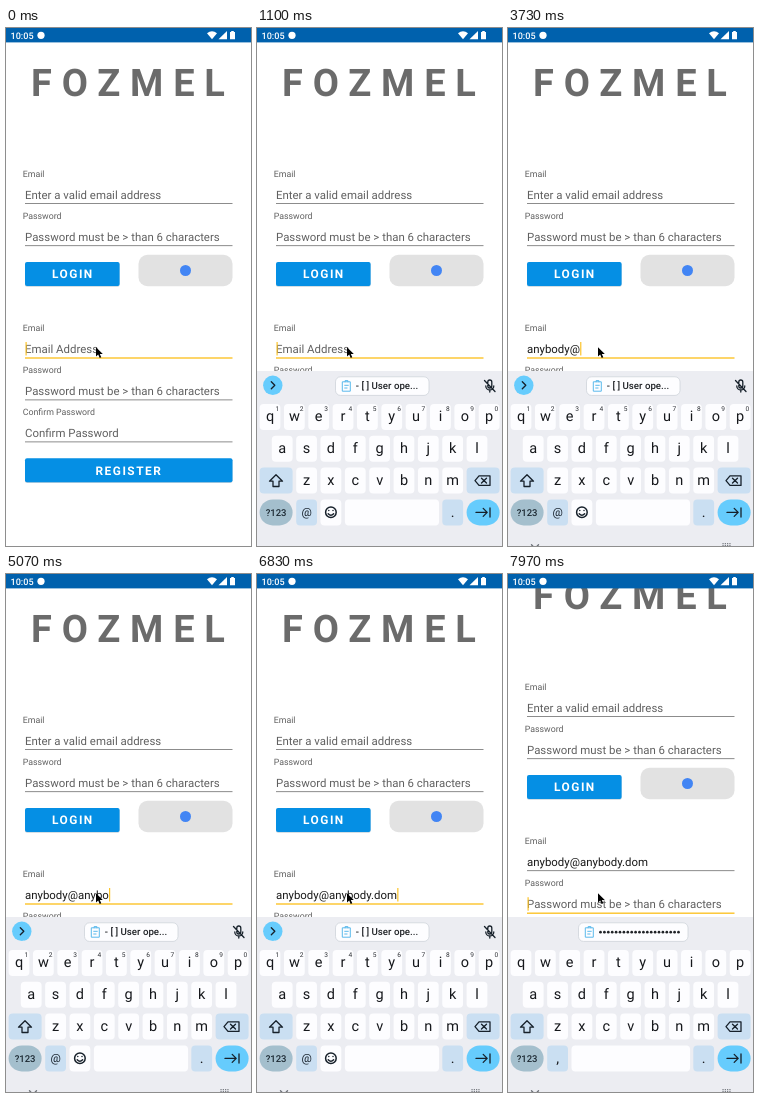
Recreate the animation shown at these times as an HTML page. Size 245 by 518 pixels, loop 8 s.

```html
<!DOCTYPE html>
<html lang="en">
<head>
<meta charset="utf-8">
<title>Sign-up form</title>
<style>
html, body { margin: 0; width: 100%; height: 100%; overflow: hidden; background: #fff; }
svg { display: block; width: 100vw; height: 100vh; font-family: Roboto, sans-serif; }
text { white-space: pre; text-rendering: geometricPrecision; }
.title { font-size: 38px; font-weight: 700; letter-spacing: 9.8px; fill: #6b6b6b; }
.label { font-size: 8.8px; fill: #606060; }
.field { font-size: 11.43px; fill: #606060; }
.button { font-size: 11.9px; font-weight: 700; letter-spacing: 1.5px; fill: #fff; }
.key { font-size: 14.5px; text-anchor: middle; fill: #16181c; }
.digit { font-size: 6.6px; text-anchor: middle; fill: #2c2f34; }
.line { fill: none; stroke: #16202a; stroke-width: 1.3; stroke-linejoin: round; stroke-linecap: round; }
</style>
</head>
<body>
<svg id="stage" viewBox="0 0 245 518" preserveAspectRatio="none">
  <g id="page"></g>
  <g id="status">
    <rect width="245" height="14.4" fill="#0061ad"/>
    <text x="4.5" y="11" font-size="9.1" font-weight="500" fill="#fff">10:05</text>
    <g fill="#fff">
      <circle cx="35" cy="7.3" r="3.6"/>
      <path d="M201 5.2Q206 1.4 211 5.2L206 11.3Z"/>
      <path d="M212.5 11.3H221V3Z"/>
      <path d="M224 4H225.2V3H227.8V4H229V11.3H224Z"/>
    </g>
  </g>
  <g id="keyboard"><rect y="343" width="245" height="176" fill="#ecedf2"/></g>
  <path d="M90 319.2V328.6L92.2 326.6L93.7 329.9L95.3 329.2L93.8 326H96.8Z" fill="#000"/>
</svg>
<script>
const LOOP = 8000, SWITCH = 6930, SCROLL = 33;
const ADDRESS = "anybody@anybody.dom";
const TYPED_AT = [1720, 1900, 2050, 2220, 2380, 2530, 2700, 3400, 4080, 4280,
                  4500, 4700, 4900, 5150, 5320, 5680, 5930, 6140, 6350];
const YELLOW = "#fcc42a", PALE = "#cadff2", SKY = "#66ccfd", WHITE = "#fdfdff";

const $ = id => document.getElementById(id);
function add(parent, tag, attrs = {}, content = "") {
  const node = document.createElementNS("http://www.w3.org/2000/svg", tag);
  for (const name in attrs) node.setAttribute(name, attrs[name]);
  node.textContent = content;
  parent.append(node);
  return node;
}
const text = (parent, cls, x, y, s) => add(parent, "text", { class: cls, x, y }, s);
const box = (parent, x, y, width, height, rx, fill) =>
  add(parent, "rect", { x, y, width, height, rx, fill });
const path = (parent, d, more = {}) => add(parent, "path", { class: "line", d, ...more });
const show = (node, opacity) => node.setAttribute("opacity", +opacity);
const shift = (node, y) => node.setAttribute("transform", `translate(0 ${y})`);
const clamp = v => Math.max(0, Math.min(1, v));
const easeOut = v => 1 - (1 - clamp(v)) ** 3;

// Form
const page = $("page");
text(page, "title", 25, 68, "FOZMEL");

function field(label, hint, y) {
  text(page, "label", 16.7, y - 22, label);
  return {
    hint: text(page, "field", 19, y, hint),
    rule: box(page, 19, y + 4.7, 207.5, .8, 0, "#707070")
  };
}
function button(label, x, y, width, textX) {
  box(page, x, y + .7, width, 24, 2, "#c6d3dc");
  box(page, x, y, width, 24, 2, "#058fe4");
  text(page, "button", textX, y + 16.4, label);
}
field("Email", "Enter a valid email address", 170.5);
field("Password", "Password must be > than 6 characters", 212.6);
button("LOGIN", 19, 234, 94.6, 46);
box(page, 132.5, 226.8, 94, 31.4, 9, "#e2e2e2");
add(page, "circle", { cx: 179.5, cy: 242.5, r: 5.5, fill: "#4285f4" });

const email = field("Email", "Email Address", 324.6);
const password = field("Password", "Password must be > than 6 characters", 366.8);
field("Confirm Password", "Confirm Password", 408.8);
button("REGISTER", 19, 430.3, 207.5, 89.5);

const typed = text(page, "field", 19, 324.6, "");
typed.style.fill = "#181818";
const caret = box(page, 19.5, 314, 1.2, 13.5, 0, YELLOW);

// Keyboard
const keyboard = $("keyboard");
const PITCH = 24.35;
function key(parent, left, y, width, fill, label = "", rx = 4) {
  box(parent, left, y - 13, width, 26, rx, fill);
  if (label) text(parent, "key", left + width / 2, y + 4.3, label);
}
const letters = (row, left, y) => [...row].forEach((c, i) =>
  key(keyboard, left + i * PITCH, y, 20.8, WHITE, c));

letters("qwertyuiop", 2.6, 389);
letters("asdfghjkl", 14.8, 420.8);
letters("zxcvbnm", 39.2, 452.6);
key(keyboard, 2.6, 452.6, 33, PALE);
path(keyboard, "M19 446.8L12.5 453.2H16V458.5H22V453.2H25.5Z");
key(keyboard, 209.6, 452.6, 33, PALE);
path(keyboard, "M222 447.8H233V457.4H222L218 452.6ZM224.5 450.2L229.5 455M229.5 450.2L224.5 455");
key(keyboard, 2.6, 484.4, 33, "#a4bfcd", "", 13);
add(keyboard, "text", { x: 19.1, y: 487.6, "font-size": 9.5, "font-weight": 500, "text-anchor": "middle", fill: "#1d2a33" }, "?123");
key(keyboard, 185.3, 484.4, 20.8, PALE, ".");
key(keyboard, 209.6, 484.4, 33, SKY, "", 13);
path(keyboard, "M219 484.4H230M226.2 480.4L230.2 484.4L226.2 488.4M233 480V489", { "stroke-width": 1.4 });

function clipboard(parent, x) {
  path(parent, `M${x} 353.8h7.6v9.4h-7.6ZM${x + 2.4} 353.8v-1.2h2.8v1.2M${x + 2} 357.3h3.6M${x + 2} 360h2.4`,
    { style: "stroke:#5bb9ec;stroke-width:1" });
}
function chip(parent, x, width) {
  const rect = box(parent, x, 348.8, width, 18.6, 5, WHITE);
  rect.setAttribute("stroke", "#c9ced6");
  rect.setAttribute("stroke-width", .7);
  clipboard(parent, x + 7.2);
}

const emailKeys = add(keyboard, "g");
[..."1234567890"].forEach((d, i) => text(emailKeys, "digit", 20.3 + i * PITCH, 383, d));
key(emailKeys, 39.2, 484.4, 20.8, PALE);
add(emailKeys, "text", { x: 49.6, y: 487.8, "font-size": 11.5, "text-anchor": "middle", fill: "#16202a" }, "@");
key(emailKeys, 63.5, 484.4, 20.8, WHITE);
add(emailKeys, "circle", { class: "line", cx: 73.9, cy: 484.2, r: 5.3, style: "stroke-width:1.5" });
path(emailKeys, "M71.8 482.4v.2M76 482.4v.2M71.2 485.8Q73.9 488.8 76.6 485.8", { style: "stroke-width:1.5" });
key(emailKeys, 87.9, 484.4, 94.2, WHITE);

const emailBar = add(keyboard, "g");
add(emailBar, "circle", { cx: 15.8, cy: 357.3, r: 9.7, fill: SKY });
path(emailBar, "M14.3 353.8L17.8 357.3L14.3 360.8", { "stroke-width": 1.4 });
chip(emailBar, 78.5, 93.5);
add(emailBar, "text", { x: 98.8, y: 361.3, "font-size": 9.7, "font-weight": 500, fill: "#202327" }, "- [ ] User ope...");
path(emailBar, "M230.8 358V354a2 2 0 0 1 4 0V358a2 2 0 0 1-4 0M228.8 358a4 4 0 0 0 8 0M232.8 362V364M227.5 352.5L238 363.5");

const passwordKeys = add(keyboard, "g");
key(passwordKeys, 39.2, 484.4, 20.8, PALE, ",");
key(passwordKeys, 63.5, 484.4, 118.6, WHITE);
const passwordBar = add(keyboard, "g");
chip(passwordBar, 70.5, 109.5);
for (let i = 0; i < 21; i++)
  add(passwordBar, "circle", { cx: 92.5 + i * 3.9, cy: 358.2, r: 1.35, fill: "#202327" });

const nav = add(keyboard, "g");
path(nav, "M23.5 516.8L27 520.3L30.5 516.8", { style: "stroke:#6b6f75" });
path(nav, "M215 515.7H224M215 517.7H224", { "stroke-dasharray": ".1 2.2", style: "stroke:#6b6f75" });

function setFocus(item, focused) {
  item.rule.setAttribute("fill", focused ? YELLOW : "#707070");
  item.rule.setAttribute("height", focused ? 1.4 : .8);
}

function draw(t) {
  const onPassword = t >= SWITCH;
  const count = TYPED_AT.filter(at => at <= t).length;
  const lastInput = onPassword ? SWITCH : count ? TYPED_AT[count - 1] : 0;

  typed.textContent = ADDRESS.slice(0, count);
  show(email.hint, !count);
  setFocus(email, !onPassword);
  setFocus(password, onPassword);

  const caretX = onPassword || !count ? 19.5 : 19.2 + typed.getComputedTextLength();
  caret.setAttribute("x", caretX);
  caret.setAttribute("y", onPassword ? 356.2 : 314);
  show(caret, (t - lastInput) % 1000 < 500);

  shift(page, -SCROLL * easeOut((t - SWITCH) / 250));
  shift(keyboard, 176 * (1 - easeOut((t - 300) / 300)));

  const switched = t >= SWITCH + 130;
  show(emailKeys, !switched);
  show(emailBar, !switched);
  show(passwordKeys, switched);
  show(passwordBar, clamp((t - 7540) / 150));
  show(nav, clamp((t - 1200) / 150));
}

function frame() {
  draw(performance.now() % LOOP);
  requestAnimationFrame(frame);
}
frame();
</script>
</body>
</html>
```
